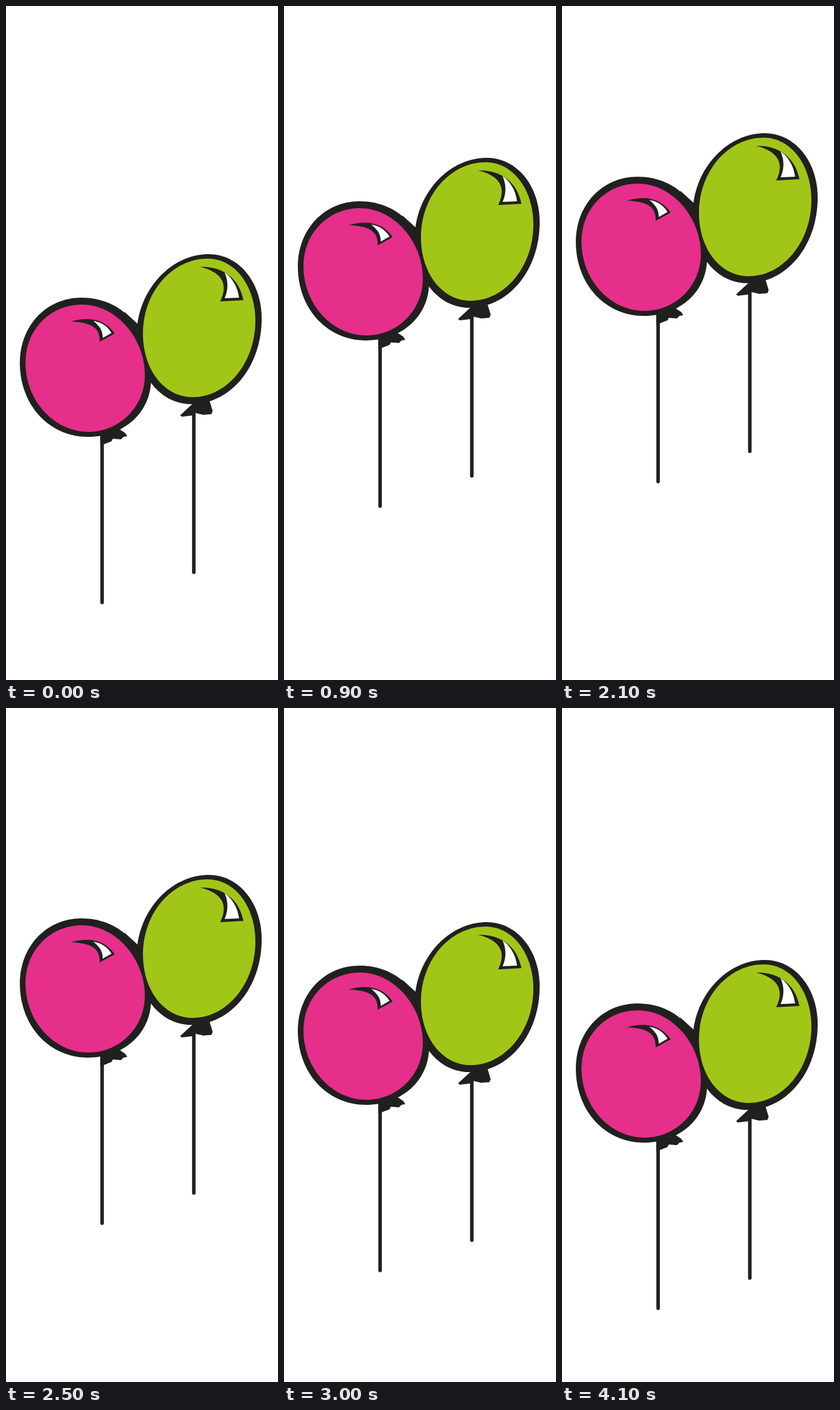
Write an HTML page that moves like this. It is 433x1070 px and loops after 4.2 s.

```html
<!DOCTYPE html>
<html lang="en">
<head>
<meta charset="utf-8">
<title>Balloons</title>
<style>
  html, body { margin: 0; width: 100%; height: 100%; overflow: hidden; background: #fff; }
  svg { display: block; width: 100%; height: 100%; }
  .ink { fill: #20201f; }
  .string { fill: none; stroke: #20201f; stroke-width: 5.6; stroke-linecap: round; }
  .pink { fill: #e62f8b; }
  .green { fill: #a2c617; }
  .shine { fill: #fff; }
</style>
</head>
<body>
<svg viewBox="0 0 433 1070">
  <g id="balloons">
    <path class="string" d="M153 680V947M299 640V899"/>

    <!-- knots -->
    <path class="ink" d="M150 680V698L168 691L170 687L183 688L187 684L193 683L190 678L175 668Z"/>
    <path class="ink" d="M303 626L277 650L280 652L297 650L301 646L314 649L327 648L329 643L322 620Z"/>

    <!-- outlines -->
    <path class="ink" d="M120 463C186 463 231 514 231 592C231 645 188 684 130 684C70 684 22 635 22 566C22 508 64 463 120 463Z"/>
    <path class="ink" d="M323 394C371 394 407 439 407 496C407 573 357 632 295 632C246 632 208 587 208 522C208 454 260 394 323 394Z"/>
    <path class="ink" d="M188 485L210 505L216 540L200 520Z"/>

    <!-- bodies -->
    <path class="pink" d="M121 474C175 474 221 527 221 586C221 636 181 676 131 676C77 676 31 627 31 566C31 514 70 474 121 474Z"/>
    <path class="green" d="M321 401C365 401 397 445 397 500C397 566 352 621 297 621C253 621 218 579 218 520C218 455 264 401 321 401Z"/>

    <!-- highlights -->
    <path class="ink" d="M103 501C130 493 157 496 173 520L149 533C150 514 140 502 103 501Z"/>
    <path class="shine" d="M139 500C152 502 161 508 168 519L154 527C154 515 149 508 139 500Z"/>
    <path class="ink" d="M309 414C345 413 371 432 378 467L341 469C352 447 350 424 309 414Z"/>
    <path class="shine" d="M348 423C360 431 369 446 371 463L348 464C354 450 354 437 348 423Z"/>
  </g>
</svg>
<script>
  const TICK = 100, TICKS = 42;
  const RISE_START = 3, FALL_START = 21;

  // Distance covered on each tick: a quick lift that eases out, then a drop that settles slowly.
  const rise = [6, 27, 30, 27, 24, 21, 18, 15, 12, 9, 6, 3];
  const fall = [6, 9, 15, 18, 21, 27, 18, 12, 9, 9, 9, 0, 9, 9, 6, 9, 6, 6, 0, 3, 3];

  const travelled = (steps, count) =>
    steps.slice(0, Math.max(0, count)).reduce((sum, step) => sum + step, 0);

  const balloons = document.getElementById("balloons");
  const start = performance.now();

  function draw() {
    const elapsed = Math.max(0, performance.now() - start);
    const tick = Math.floor(elapsed / TICK) % TICKS;
    const y = travelled(fall, tick - FALL_START + 1) - travelled(rise, tick - RISE_START + 1);
    balloons.setAttribute("transform", `translate(0 ${y})`);
    requestAnimationFrame(draw);
  }
  draw();
</script>
</body>
</html>
```
